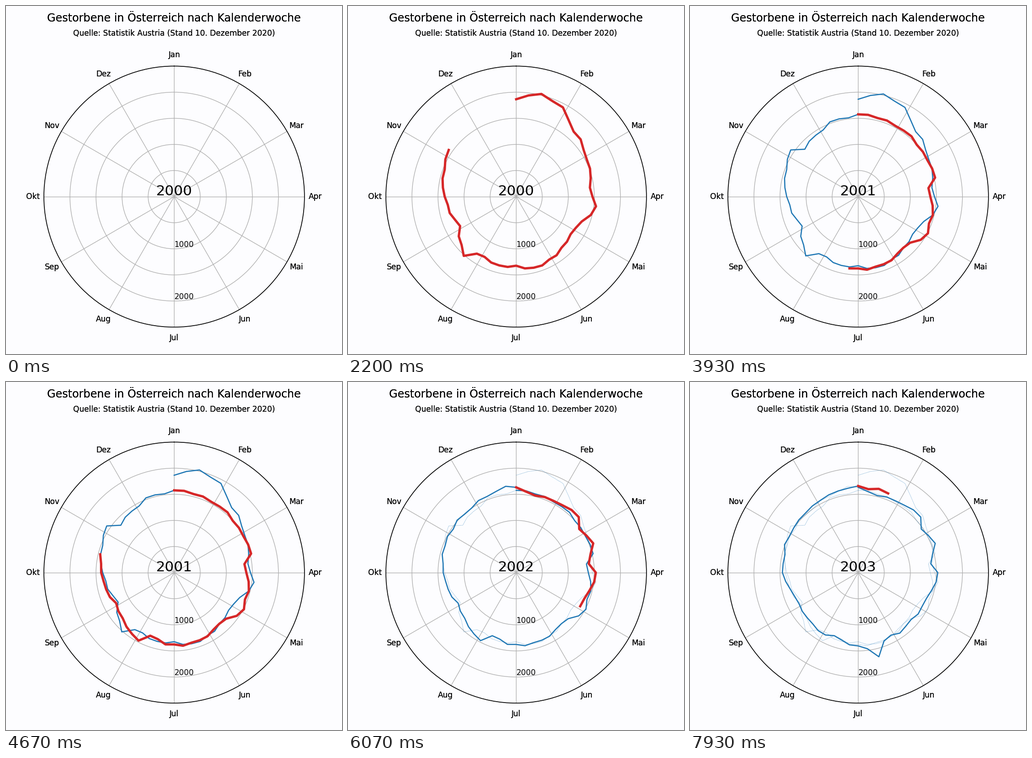
A matplotlib script that plays this animation: 736 px wide and 761 px high, repeating every 8000 ms.

```python
import numpy as np
import matplotlib.pyplot as plt
from matplotlib.animation import FuncAnimation

W, H, DPI = 736, 761, 100
K = W / 600          # scale of point sizes on this stage
CX, CY, R = 368.4, 416.8, 285.4
R_MAX = 2500
FIRST, YEARS, WEEKS = 2000, 4, 52
FRAMES, INTERVAL = 200, 40
BACK, RED, BLUE = "#fdfdff", "#d62728", "#1f77b4"

# Turning points of the weekly deaths, as week: count for each year
turns = [
    {0: 1865, 2: 2025, 4: 1930, 6: 1663, 12: 1425, 14: 1543, 17: 1291,
     23: 1410, 31: 1328, 32: 1517, 35: 1215, 44: 1573, 45: 1368},
    {0: 1576, 7: 1500, 11: 1520, 12: 1358, 17: 1512, 20: 1308, 25: 1411,
     29: 1293, 30: 1472, 35: 1258, 39: 1401, 45: 1514},
    {0: 1633, 2: 1520, 7: 1604, 8: 1470, 10: 1581, 12: 1403, 13: 1528, 16: 1400,
     23: 1400, 24: 1660, 25: 1469, 28: 1330, 36: 1300, 39: 1454, 44: 1504, 50: 1610},
    {0: 1659, 1: 1610, 3: 1622},
]


def weekly_deaths():
    """Join the turning points, with a little noise on the weeks between."""
    weeks = [y * WEEKS + w for y, year in enumerate(turns) for w in year]
    counts = [n for year in turns for n in year.values()]
    deaths = np.interp(np.arange(YEARS * WEEKS), weeks, counts)
    deaths += np.random.default_rng(7).normal(0, 22, deaths.size)
    deaths[weeks] = counts
    return deaths


deaths = weekly_deaths()
angles = 2 * np.pi * np.arange(WEEKS + 1) / WEEKS

fig = plt.figure(figsize=(W / DPI, H / DPI), dpi=DPI, facecolor=BACK)
ax = fig.add_axes([(CX - R) / W, 1 - (CY + R) / H, 2 * R / W, 2 * R / H],
                  projection="polar", facecolor=BACK)
ax.set_theta_zero_location("N")
ax.set_theta_direction(-1)
ax.set_ylim(0, R_MAX)
ax.set_yticks(range(500, R_MAX, 500), labels=[])
ax.set_xticks(np.arange(12) * np.pi / 6, labels=[])
ax.grid(color="#b0b0b0", linewidth=0.8 * K)
ax.spines["polar"].set_linewidth(K)

for r in (1000, 2000):
    ax.text(np.pi, r, str(r), size=10 * K, ha="left", va="bottom")


def put(y, text, size):
    return fig.text(368 / W, 1 - y / H, text, size=size * K,
                    ha="center", va="baseline")


months = "Jan Feb Mar Apr Mai Jun Jul Aug Sep Okt Nov Dez".split()
for _ in range(2):  # drawn twice for a heavier face
    put(33.6, "Gestorbene in Österreich nach Kalenderwoche", 14)
    put(64.6, "Quelle: Statistik Austria (Stand 10. Dezember 2020)", 10)
    for i, month in enumerate(months):
        ax.text(i * np.pi / 6, R_MAX * 309.3 / R, month, size=10 * K,
                ha="center", va="center")
year_text = put(414.5, str(FIRST), 18.3)

lines = [ax.plot([], [])[0] for _ in range(YEARS)]
styles = [(RED, 3, "-"), (BLUE, 1.5, "-"), (BLUE, 0.5, ":")]


def draw(frame):
    # 20 weeks per second, held in steps of 1/15 second
    ms = frame * INTERVAL + 35
    step = int(ms * 15 / 1000)
    now, week = divmod(round(step * 4 / 3), WEEKS)
    for i, line in enumerate(lines):
        age = min(max(now - i, 0), 2)
        if i < now:
            n = WEEKS + 1
        else:
            n = week + 1 if i == now and week else 0
        line.set_data(angles[:n], deaths[i * WEEKS:i * WEEKS + n])
        color, width, dash = styles[age]
        line.set(color=color, linewidth=width * K, linestyle=dash, zorder=5 - age)
    year_text.set_text(str(FIRST + now))
    return [*lines, year_text]


anim = FuncAnimation(fig, draw, frames=FRAMES, interval=INTERVAL,
                     init_func=lambda: draw(0), repeat=True, blit=False)
plt.show()
```
